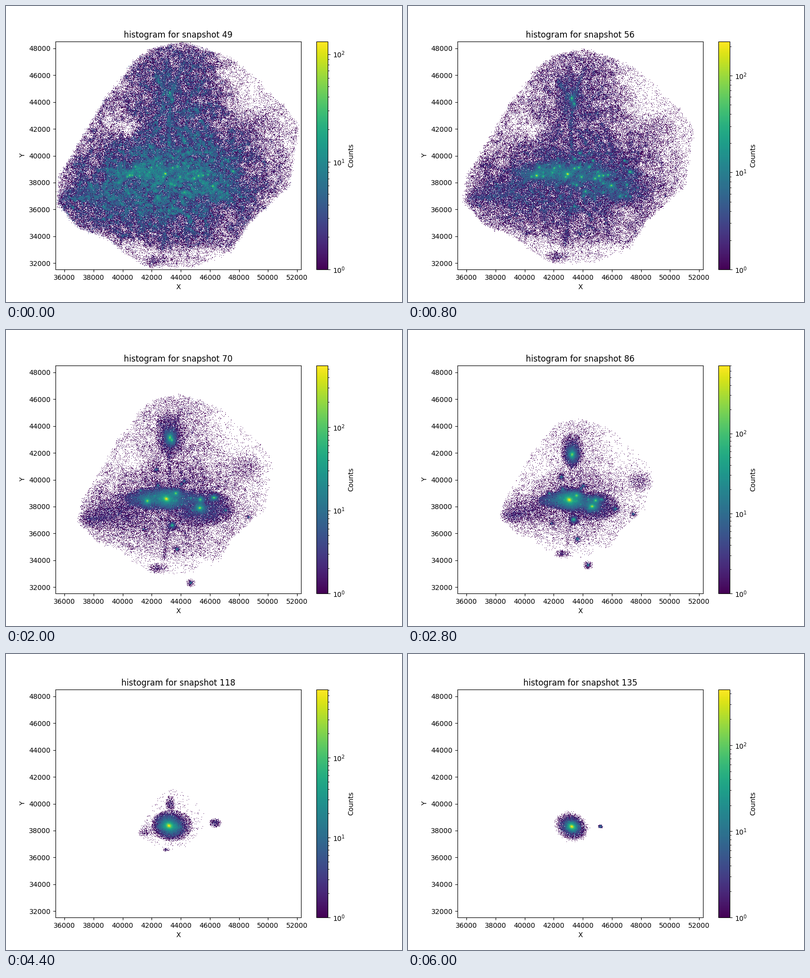
Write a matplotlib script that moves like this. It is 800 by 600 pixels and loops after 6.2 s.

```python
import numpy as np
import matplotlib.pyplot as plt
from matplotlib.animation import FuncAnimation
from matplotlib.colors import LogNorm
from matplotlib.path import Path

rng = np.random.default_rng(49)

FRAMES, INTERVAL = 31, 200
KEYS = [0, 2, 6, 10, 14, 22, 30]
SNAPSHOT = [49, 53, 60, 70, 86, 118, 135]
VMAX = [131, 172, 291, 552, 704, 711, 444]

# Pixel box of the axes; one histogram bin per pixel
LEFT, TOP, COLS, ROWS = 100, 72, 496, 462
CENTRE = np.array([332.0, 351.0])


def vmax(i):
    return np.exp(np.interp(i, KEYS, np.log(VMAX)))


def scale(i):
    """Overall size of the collapsing region, 1 at the start."""
    return (1 - 0.012 * i) / (1 + (i / 19) ** 3.5)


def ease(t):
    t = np.clip(t, 0, 1)
    return t * t * (3 - 2 * t)


def contract(p, i, pull=1.0):
    """Move positions towards the centre; a larger pull falls in faster."""
    return CENTRE + (p - CENTRE) * scale(i) ** np.asarray(pull)


# ---- diffuse matter -------------------------------------------------------

OUTLINE = [(355, 73), (450, 103), (510, 150), (565, 205), (592, 245),
           (583, 300), (572, 365), (490, 440), (455, 500), (375, 528),
           (290, 531), (245, 503), (205, 470), (148, 450), (105, 402),
           (108, 345), (150, 275), (200, 190), (262, 110), (290, 88)]
# amount, centre x, centre y, radius x, radius y
DENSE = [(4.2, 368, 335, 135, 105), (1.5, 255, 345, 90, 70),
         (1.1, 170, 375, 75, 70), (2.0, 345, 165, 90, 100),
         (1.2, 340, 430, 140, 65), (1.1, 215, 410, 110, 55),
         (0.5, 205, 235, 70, 110)]
VOIDS = [(0.75, 238, 243, 45, 28), (0.7, 490, 175, 35, 50),
         (0.6, 400, 500, 90, 14)]


def smooth_noise(shape, size):
    fy = np.fft.fftfreq(shape[0])[:, None]
    fx = np.fft.fftfreq(shape[1])[None, :]
    kernel = np.exp(-2 * (np.pi * size) ** 2 * (fx ** 2 + fy ** 2))
    noise = np.fft.ifft2(np.fft.fft2(rng.normal(size=shape)) * kernel).real
    return noise / noise.std()


def make_diffuse():
    y, x = np.mgrid[TOP:TOP + ROWS, LEFT:LEFT + COLS] + 0.5

    def blob(cx, cy, rx, ry):
        return np.exp(-(((x - cx) / rx) ** 2 + ((y - cy) / ry) ** 2) ** 1.3)

    d = 0.15 + sum(a * blob(*box) for a, *box in DENSE)
    for a, *box in VOIDS:
        d *= 1 - a * blob(*box)
    web = 0.8 - np.abs(smooth_noise(d.shape, 9))
    d *= np.exp(0.5 * web + 0.3 * smooth_noise(d.shape, 2) - 0.1)

    cells = np.column_stack([x.ravel(), y.ravel()])
    rough = cells + rng.normal(0, 2, cells.shape)
    d = d.ravel() * Path(OUTLINE).contains_points(rough)
    idx = np.repeat(np.arange(d.size), rng.poisson(d))
    return cells[idx] + rng.uniform(-.5, .5, (idx.size, 2)), d[idx]


field, density = make_diffuse()
field_u = rng.random(len(field))


def diffuse(i):
    """Matter thins out as it falls into halos, dense places fastest."""
    left = np.exp(-i / 6.5) * density ** (-0.015 * i)
    return contract(field[field_u < left * scale(i) ** 2], i)


# ---- filaments ------------------------------------------------------------

def strand(n, width, *points):
    pts = np.array(points, float)
    run = np.r_[0, np.cumsum(np.hypot(*np.diff(pts, axis=0).T))]
    t = rng.random(n) * run[-1]
    line = np.column_stack([np.interp(t, run, axis) for axis in pts.T])
    line += rng.normal(0, width, line.shape)
    return lambda i: contract(line[:int(n * np.exp(-(i / 9) ** 2))], i)


strands = [
    strand(4500, 3, (340, 165), (328, 230), (333, 330), (326, 410), (316, 495)),
    strand(1800, 3, (300, 140), (331, 185), (360, 110)),
    strand(1500, 2.5, (112, 391), (190, 386), (245, 345)),
    strand(900, 3, (140, 318), (205, 335), (260, 340)),
    strand(3000, 5, (235, 340), (330, 335), (400, 320)),
    strand(2500, 4, (385, 300), (470, 340), (425, 405), (390, 330)),
]


# ---- soft clouds ----------------------------------------------------------

def cloud(x, y, sx, sy, n, peak, width, pull=1.0):
    """Gaussian cloud, cut at two sigma, richest at time peak."""
    r = np.sqrt(-2 * np.log(1 - 0.865 * rng.random(n)))
    phi = rng.uniform(0, 2 * np.pi, n)
    offset = np.column_stack([sx * r * np.cos(phi), sy * r * np.sin(phi)])

    def place(i):
        m = int(n * np.exp(-((i - peak) / width) ** 2))
        return contract(np.array([x, y]), i, pull) + offset[:m] * scale(i)
    return place


clouds = [
    cloud(300, 336, 46, 15, 22000, 9, 10, 2),
    cloud(345, 340, 75, 58, 8000, 19, 7),
    cloud(420, 365, 42, 24, 14000, 6, 9, 1.4),
    cloud(332, 178, 19, 30, 5000, 8, 9),
    cloud(190, 372, 45, 26, 5000, 6, 9),
    cloud(505, 238, 22, 18, 700, 8, 20, (.5, 2)),
    cloud(300, 517, 14, 7, 500, 3, 14),
    cloud(135, 392, 20, 14, 1000, 10, 8),
]


# ---- dense halos ----------------------------------------------------------

BETA = 1.15


def halo(x, y, share, pull=1.0, merge=20, q=1.0, tilt=0.0):
    """Cusp whose central count is a share of the colour maximum."""
    def profile(i):
        grown = ease(i / 14)
        core, size = 1 + 1.2 * grown * share ** .5, 8 + 22 * grown * share
        inside = 1 - (1 + (size / core) ** 2) ** (1 - BETA)
        peak = share * vmax(i) * np.clip((merge - i) / 6, 0, 1)
        return core, inside, int(peak * np.pi * core ** 2 * inside / (BETA - 1))

    count = max(profile(i)[2] for i in range(FRAMES))
    u, phi = rng.random(count), rng.uniform(0, 2 * np.pi, count)
    blur = 1 + 0.12 * rng.normal(size=count)

    def place(i):
        core, inside, m = profile(i)
        r = core * np.sqrt((1 - u[:m] * inside) ** (1 / (1 - BETA)) - 1) * blur[:m]
        dx = r * np.cos(phi[:m])
        dy = r * np.sin(phi[:m]) * q + tilt * dx
        return contract(np.array([x, y]), i, pull) + np.column_stack([dx, dy])
    return place


halos = [
    halo(322, 340, .95, merge=99, q=.87, tilt=.15),
    halo(250, 343, .55, 2.5, merge=14),
    halo(346, 326, .30),
    halo(418, 365, .45, 1.6, q=.8),
    halo(408, 342, .25),
    halo(459, 335, .30, 1.6, merge=15, q=.7),
    halo(331, 176, .40, 1.2, q=1.5),
    halo(336, 190, .25, merge=15, q=1.3),
    halo(337, 410, .15, 1.2),
]
# Early knots in the band and right of it, then lasting small satellites
for _ in range(18):
    halos.append(halo(rng.uniform(240, 400), rng.normal(336, 7),
                      rng.uniform(.1, .4), merge=10))
    halos.append(halo(rng.uniform(330, 465), rng.uniform(290, 410),
                      rng.uniform(.05, .25), merge=10))
    halos.append(halo(*rng.normal(CENTRE, (85, 70)), rng.uniform(.02, .05)))

PARTS = [diffuse, *strands, *clouds, *halos]


def histogram(i):
    x, y = np.concatenate([part(i) for part in PARTS]).T
    col, row = np.floor(x - LEFT).astype(int), np.floor(y - TOP).astype(int)
    ok = (col >= 0) & (col < COLS) & (row >= 0) & (row < ROWS)
    counts = np.bincount(row[ok] * COLS + col[ok], minlength=ROWS * COLS)
    return np.ma.masked_equal(counts.reshape(ROWS, COLS), 0)


# ---- figure ---------------------------------------------------------------

fig, ax = plt.subplots(figsize=(8, 6), dpi=100)
image = ax.imshow(histogram(0), norm=LogNorm(1, VMAX[0]), cmap="viridis",
                  extent=(35387, 52272, 31534, 48504), aspect="auto",
                  interpolation="nearest")
ax.set_xlabel("X")
ax.set_ylabel("Y")
title = ax.set_title("")
fig.colorbar(image, ax=ax, label="Counts")


def update(i):
    image.set_data(histogram(i))
    image.set_clim(1, vmax(i))
    title.set_text(f"histogram for snapshot {round(np.interp(i, KEYS, SNAPSHOT))}")
    return image, title


anim = FuncAnimation(fig, update, frames=FRAMES, interval=INTERVAL,
                     init_func=lambda: (), repeat=True, repeat_delay=0)
plt.show()
```
